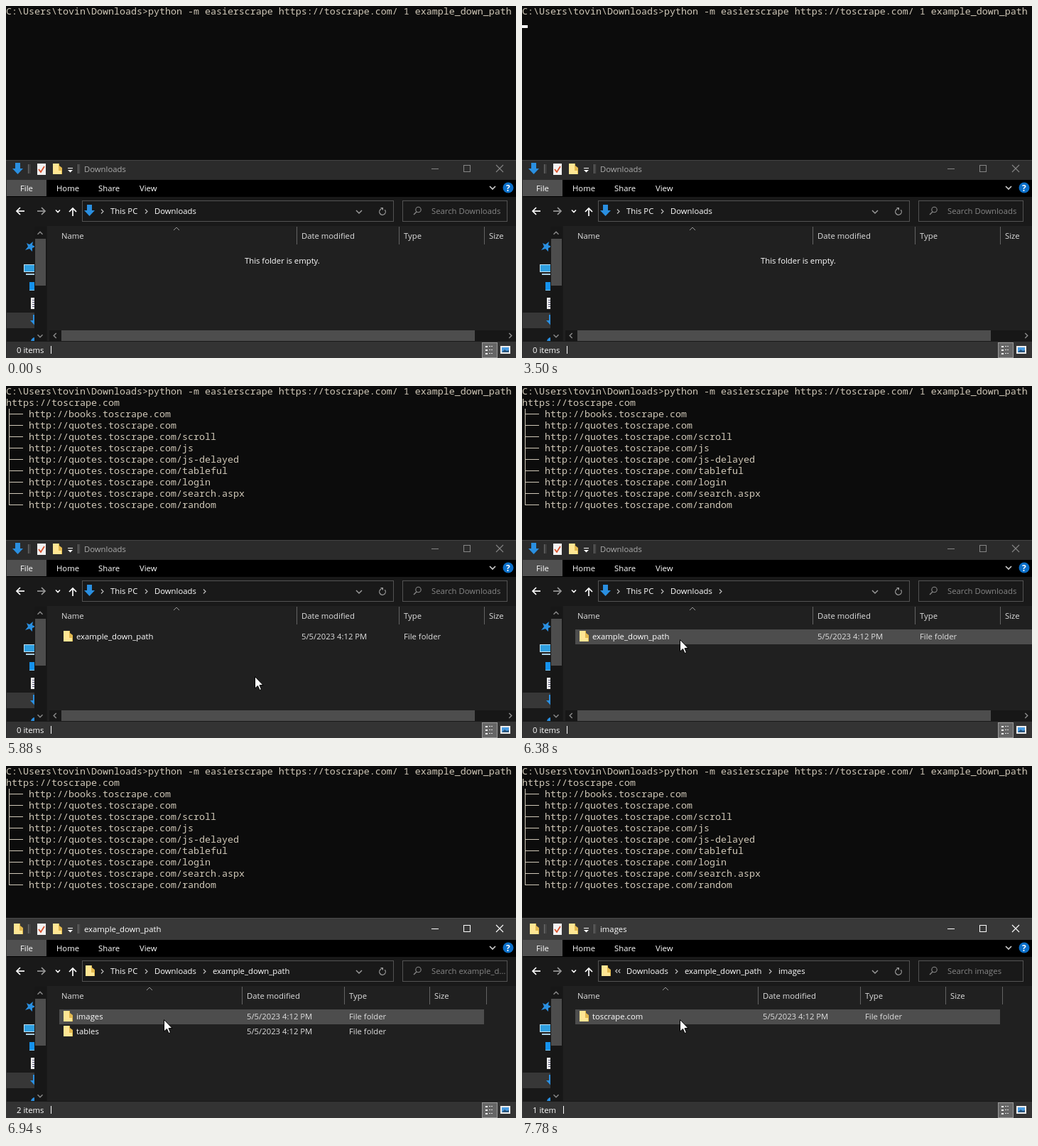
These frames come from a looping animation (718x496 px, 8000 ms). An HTML page with a canvas:

```html
<!DOCTYPE html>
<html lang="en">
<head>
<meta charset="utf-8">
<title>Scraper demo</title>
<style>
html, body { margin: 0; width: 100%; height: 100%; overflow: hidden; background: #0c0c0c; }
canvas { display: block; }
</style>
</head>
<body>
<canvas id="stage" width="718" height="496"></canvas>
<script>
const ctx = document.getElementById('stage').getContext('2d');
const LOOP = 8000;
const UI = '11.3px "Open Sans", "Noto Sans", sans-serif';
const MONO = '13.333px "Noto Sans Mono", "DejaVu Sans Mono", monospace';
const BLUE = '#2a8fe0';

const COMMAND = 'C:\\Users\\tovin\\Downloads>python -m easierscrape https://toscrape.com/ 1 example_down_path';
const LINKS = ['books.toscrape.com', ...['', '/scroll', '/js', '/js-delayed', '/tableful',
  '/login', '/search.aspx', '/random'].map(path => 'quotes.toscrape.com' + path)];

// Event times in ms
const OUTPUT = 3950, FOLDER_SHOWN = 4920, CHEVRON = 5190, MOUSE_IN = 5610, CLICK = 6510,
  BUSY = 6630, OPEN_PATH = 6940, CLICK_2 = 7360, STATUS_2 = 7480, BUSY_2 = 7630, OPEN_IMAGES = 7780;
const CURSOR_FLIPS = [410, 950, 1390, 1970, 2530, 3080, 3500, 4650, 5040, 5610, 6130, 6380];
const MOUSE_PATH = [[MOUSE_IN, 595, 416], [5760, 480, 413], [5880, 350, 409],
  [6000, 237, 402], [6130, 226, 376], [6260, 222, 357]];

function rect(x, y, w, h, color) {
  ctx.fillStyle = color;
  ctx.fillRect(x, y, w, h);
}
function frame(x, y, w, h, color) {
  ctx.strokeStyle = color;
  ctx.lineWidth = 1;
  ctx.strokeRect(x + .5, y + .5, w - 1, h - 1);
}
function text(str, x, y, color = '#fff', font = UI) {
  ctx.font = font;
  ctx.fillStyle = color;
  ctx.fillText(str, x, y);
}
function trace(points) {
  ctx.beginPath();
  for (let i = 0; i < points.length; i += 2) ctx.lineTo(points[i], points[i + 1]);
}
function line(color, width, ...points) {
  trace(points);
  ctx.strokeStyle = color;
  ctx.lineWidth = width;
  ctx.stroke();
}
function poly(color, ...points) {
  trace(points);
  ctx.closePath();
  ctx.fillStyle = color;
  ctx.fill();
}
function circle(x, y, r, color) {
  ctx.beginPath();
  ctx.arc(x, y, r, 0, 7);
  ctx.fillStyle = color;
  ctx.fill();
}
function chevron(x, y, dx, dy, size, color = '#bbb', width = 1.2) {
  // (dx, dy) is the direction the tip points to
  const tx = dx * size / 2, ty = dy * size / 2, px = dy * size, py = dx * size;
  line(color, width, x - tx - px, y - ty - py, x + tx, y + ty, x - tx + px, y - ty + py);
}

function folder(x, y) {
  poly('#e3b94f', x, y, x + 9, y, x + 9, y + 3, x + 13, y + 6, x + 13, y + 15, x, y + 15);
  poly('#ffe694', x, y, x + 8, y, x + 8, y + 10, x + 12, y + 10, x + 12, y + 15, x, y + 15);
}
function downArrow(x, y) {
  poly(BLUE, x + 4, y, x + 11, y, x + 11, y + 8, x + 15, y + 8, x + 7.5, y + 16, x, y + 8, x + 4, y + 8);
}
function grip(x) {
  rect(x, 223, 1, 13, '#777');
  rect(x + 2, 223, 1, 13, '#555');
}

function drawTerminal(t) {
  const ink = '#d0c8b8';
  text(COMMAND, 0, 12, ink, MONO);
  const done = t >= OUTPUT;
  if (done) {
    text('https://toscrape.com', 0, 28, ink, MONO);
    LINKS.forEach((link, i) => {
      const y = 32 + i * 16;
      rect(4, y, 1, i === LINKS.length - 1 ? 8 : 16, ink);
      rect(4, y + 7, 20, 1, ink);
      text('http://' + link, 32, y + 12, ink, MONO);
    });
  }
  if (CURSOR_FLIPS.filter(flip => t >= flip).length % 2) rect(0, done ? 187 : 27, 8, 4, '#fff');
}

function drawTitle(active, view) {
  const top = active ? 214 : 217;
  rect(0, top, 718, 496 - top, active ? '#383838' : '#2b2b2b');
  rect(0, top, 718, 1, active ? '#4b4b4b' : '#444');
  if (view.depth) folder(11, 222); else downArrow(9, 221);
  grip(31);
  rect(44, 222, 12, 16, '#f2f2f2');
  line('#d9512c', 1.8, 46, 230, 49, 234, 54, 226);
  folder(66, 222);
  rect(87, 228, 7, 1, '#fff');
  poly('#fff', 87, 231, 94, 231, 90.5, 234.5);
  grip(101);
  text(view.title, 110, 234, active ? '#fff' : '#aaa');
  const control = active ? '#fff' : '#858585';
  rect(599, 229, 10, 1, control);
  frame(644, 224, 10, 10, control);
  line(control, 1.1, 690, 224, 700, 234);
  line(control, 1.1, 700, 224, 690, 234);
}

function drawToolbar(view) {
  rect(1, 245, 717, 24, '#000');
  rect(1, 245, 56, 23, '#505050');
  text('File', 20, 261);
  text('Home', 71, 261);
  text('Share', 130, 261);
  text('View', 188, 261);
  chevron(685, 256, 0, 1, 4, '#ccc', 1.6);
  circle(707, 256, 7.5, '#0b6fc9');
  text('?', 704, 261, '#fff', 'bold 12px "Open Sans", sans-serif');

  rect(1, 269, 717, 227, '#191919');
  line('#fff', 1.7, 26, 289, 15, 289);
  line('#fff', 1.7, 20, 284, 15, 289, 20, 294);
  line('#999', 1.7, 44, 289, 55, 289);
  line('#999', 1.7, 50, 284, 55, 289, 50, 294);
  chevron(73, 289, 0, 1, 3, '#fff', 1.6);
  line('#fff', 1.7, 94, 296, 94, 285);
  line('#fff', 1.7, 89, 290, 94, 285, 99, 290);

  frame(107, 274, 439, 30, '#535353');
  if (view.depth) folder(112, 281); else downArrow(110, 280);
  if (view.depth === 2) {
    chevron(133, 289, -1, 0, 2.5);
    chevron(137, 289, -1, 0, 2.5);
  } else chevron(135.5, 289.5, 1, 0, 3);
  for (const [label, x] of view.crumbs) text(label, x, 293);
  for (const x of view.chevrons) chevron(x + .5, 289.5, 1, 0, 3);
  chevron(497, 290, 0, 1, 4, '#999', 1.5);
  ctx.beginPath();
  ctx.arc(530, 290, 4.3, -.7, 4.3);
  ctx.strokeStyle = '#999';
  ctx.lineWidth = 1.3;
  ctx.stroke();
  poly('#999', 527, 284, 531, 284, 531, 288);

  frame(558, 274, 148, 30, '#535353');
  ctx.beginPath();
  ctx.arc(580.5, 287, 3.7, 0, 7);
  ctx.strokeStyle = '#888';
  ctx.lineWidth = 1.1;
  ctx.stroke();
  line('#888', 1.2, 578, 290, 574, 294);
  text(view.search, 599, 293, '#858585');
}

function drawSidebar() {
  rect(1, 432, 39, 22, '#373737');
  ctx.save();
  ctx.beginPath();
  ctx.rect(0, 309, 40, 163);
  ctx.clip();
  poly(BLUE, 29, 334, 33, 336, 38, 332, 37, 337, 42, 339, 37, 341, 37, 346, 33, 342, 27, 344, 31, 339);
  rect(25, 364, 16, 11, '#bfe0f2');
  rect(26, 365, 15, 9, '#2f9fe0');
  rect(28, 377, 12, 2, '#a9cfe4');
  rect(33, 389, 14, 12, '#1592ee');
  rect(33, 400, 14, 1, '#7cc4f5');
  rect(35, 411, 12, 16, '#eee');
  for (const y of [414, 417, 420, 423]) rect(37, y, 7, 1, '#557');
  downArrow(34, 435);
  circle(41, 473, 6, BLUE);
  ctx.restore();
  rect(40, 311, 17, 161, '#171717');
  rect(41, 328, 15, 66, '#4d4d4d');
  chevron(48, 320, 0, -1, 3.5, '#888', 1.5);
  chevron(48, 465, 0, 1, 3.5, '#888', 1.5);
}

function drawList(view, hovered, selected) {
  rect(58, 310, 660, 162, '#202020');
  const { cols, right } = view;
  for (const x of view.lines) rect(x, 311, 1, 25, '#636363');
  chevron(view.sortX, 314, 0, -1, 4, '#999', 1);
  ['Name', 'Date modified', 'Type', 'Size'].forEach((label, i) => text(label, [78, ...cols][i], 328, '#dedede'));
  if (hovered) rect(75, 343, right - 75, 21, selected ? '#777' : '#4d4d4d');
  view.rows.forEach((name, i) => {
    const y = 357 + i * 21;
    folder(81, y - 12);
    text(name, 99, y);
    text('5/5/2023 4:12 PM', cols[0], y, '#dedede');
    text('File folder', cols[1], y, '#dedede');
  });
  if (!view.rows.length) text('This folder is empty.', 336, 363);
  if (!view.depth) {
    rect(61, 457, 657, 15, '#171717');
    rect(78, 457, 582, 15, '#4d4d4d');
    chevron(69, 464.5, -1, 0, 3.5, '#888', 1.5);
    chevron(710, 464.5, 1, 0, 3.5, '#888', 1.5);
  }
}

function drawStatus(status, withSelection) {
  rect(1, 473, 717, 23, '#333');
  text(status, 15, 489);
  const bar = status.endsWith('s') ? 63 : 58;
  rect(bar, 479, 1, 11, '#fff');
  if (withSelection) {
    text('1 item selected', bar + 10, 489);
    rect(bar + 97, 479, 1, 11, '#fff');
  }
  rect(670, 474, 22, 22, '#666');
  frame(670, 474, 22, 22, '#999');
  for (const y of [479, 484, 489]) {
    rect(675, y, 3, 2, '#fff');
    rect(680, y, 2, 1, '#ddd');
    rect(683, y, 2, 1, '#ddd');
  }
  rect(696, 479, 14, 11, '#eee');
  rect(698, 481, 10, 7, '#4a9be0');
  poly('#26527a', 698, 488, 702, 484, 705, 486, 708, 485, 708, 488);
}

function drawMouse(x, y, busy) {
  if (busy) {
    ctx.beginPath();
    ctx.arc(x + .5, y + 1.5, 8, 0, 7);
    ctx.strokeStyle = '#1ba0e2';
    ctx.lineWidth = 4;
    ctx.stroke();
    return;
  }
  const shape = [0, 0, 0, 16.5, 4, 13, 6.6, 19, 9, 18, 6.5, 12, 11.5, 12].map((v, i) => v + (i % 2 ? y : x) + .5);
  poly('#fff', ...shape);
  line('#000', 1, ...shape, shape[0], shape[1]);
}

function viewAt(t) {
  const narrow = { lines: [332, 476, 596, 676], cols: [339, 483, 603], sortX: 202, right: 673 };
  if (t >= OPEN_IMAGES) return {
    ...narrow, depth: 2, title: 'images', search: 'Search images', rows: ['toscrape.com'], status: '1 item',
    crumbs: [['Downloads', 147], ['example_down_path', 229], ['images', 361]], chevrons: [217, 349],
  };
  if (t >= OPEN_PATH) return {
    ...narrow, depth: 1, title: 'example_down_path', search: 'Search example_d...', rows: ['images', 'tables'],
    status: '2 items', crumbs: [['This PC', 147], ['Downloads', 209], ['example_down_path', 291]],
    chevrons: t >= CLICK_2 ? [197, 279, 411] : [197, 279],
  };
  return {
    depth: 0, title: 'Downloads', search: 'Search Downloads', rows: t >= FOLDER_SHOWN ? ['example_down_path'] : [],
    status: t >= BUSY ? '1 item' : '0 items', crumbs: [['This PC', 147], ['Downloads', 209]],
    chevrons: t >= CHEVRON ? [197, 279] : [197],
    lines: [409, 553, 673], cols: [416, 560, 680], sortX: 240, right: 718,
  };
}

function draw(t) {
  const within = (from, to) => t >= from && t < to;
  const view = viewAt(t);
  const mouse = MOUSE_PATH.filter(([time]) => t >= time).pop();
  const hovered = mouse && mouse[2] < 364;
  rect(0, 0, 718, 496, '#0c0c0c');
  drawTerminal(t);
  drawTitle(t >= CLICK, view);
  drawToolbar(view);
  drawSidebar();
  drawList(view, hovered, within(CLICK, OPEN_PATH) || within(CLICK_2, OPEN_IMAGES));
  drawStatus(view.status, within(BUSY, OPEN_PATH) || within(STATUS_2, OPEN_IMAGES));
  if (mouse) drawMouse(mouse[1], mouse[2], within(BUSY, OPEN_PATH) || within(BUSY_2, OPEN_IMAGES));
}

const start = performance.now();
function tick() {
  draw((performance.now() - start) % LOOP);
  requestAnimationFrame(tick);
}
tick();
</script>
</body>
</html>
```
